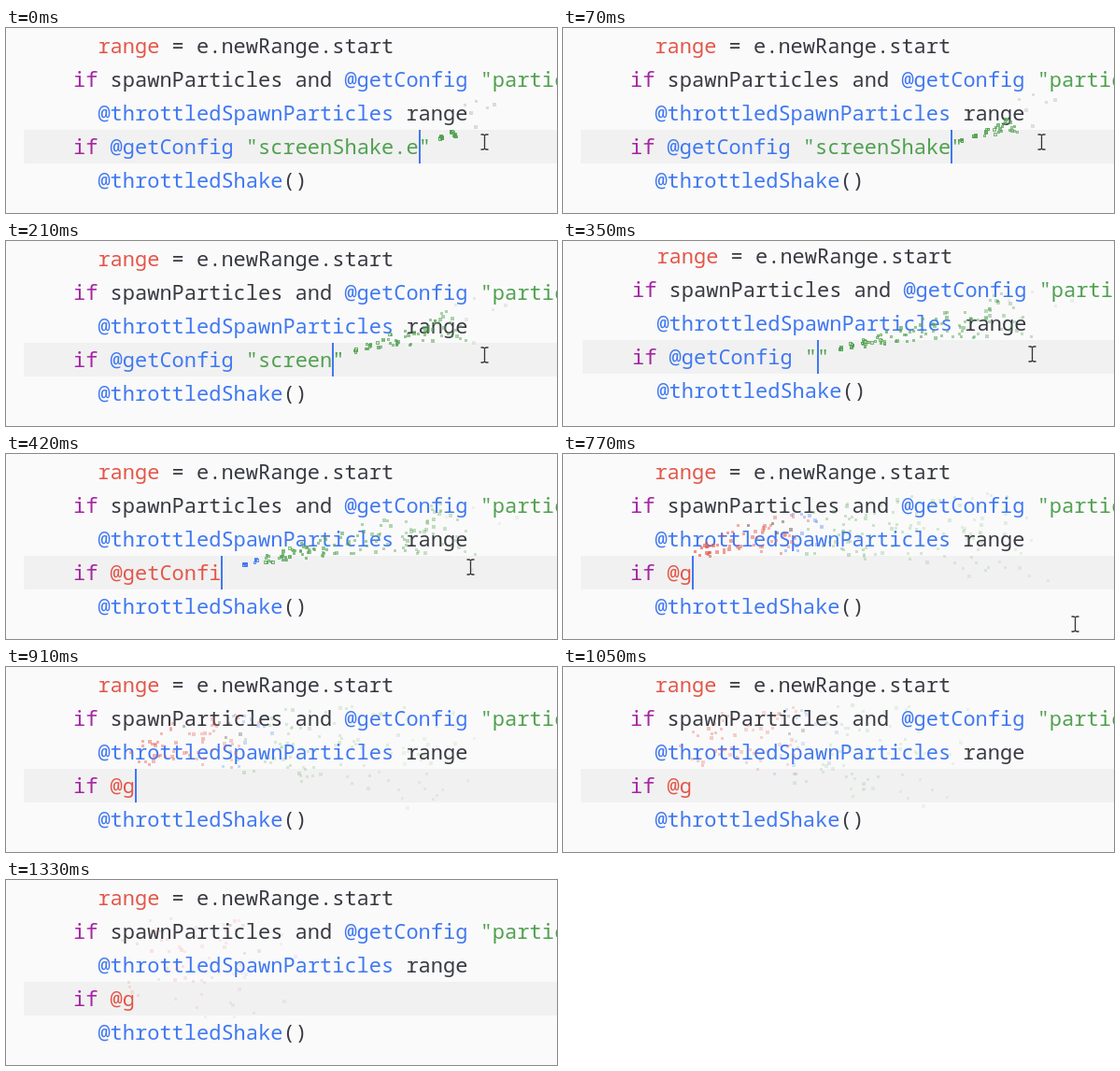
Animation, 590 px wide and 198 px high, one loop 1400 ms. Source, as an HTML page:

```html
<!DOCTYPE html>
<html lang="en">
<head>
<meta charset="utf-8">
<title>Typing particles</title>
<style>
  html, body { margin: 0; width: 100%; height: 100%; overflow: hidden; background: #fafafa; }
  svg { display: block; width: 590px; height: 198px; }
  text { font: 22px "Noto Sans Mono", "DejaVu Sans Mono", monospace; white-space: pre; fill: #383a42; }
  .blue { fill: #4078f2; }
  .red { fill: #e45649; }
  .green { fill: #50a14f; }
  .purple { fill: #a626a4; }
</style>
</head>
<body>
<svg viewBox="0 0 590 198">
  <g id="screen">
    <rect x="19" y="109" width="600" height="36" fill="#f1f1f1"/>
    <text x="98.4" y="27"><tspan class="red">range</tspan> = e.newRange.start</text>
    <text x="72" y="63"><tspan class="purple">if</tspan> spawnParticles and <tspan class="blue">@getConfig</tspan> <tspan class="green">"particles</tspan></text>
    <text x="98.4" y="99"><tspan class="blue">@throttledSpawnParticles</tspan> range</text>
    <text id="line" x="72" y="135"></text>
    <text x="98.4" y="171"><tspan class="blue">@throttledShake</tspan>()</text>
    <rect id="caret" y="109" width="2" height="36" fill="#4078f2"/>
    <g id="sparks" shape-rendering="crispEdges"></g>
  </g>
  <path id="mouse" d="M-4 -8H-1.5L0 -7L1.5 -8H4M-4 8H-1.5L0 7L1.5 8H4M0 -7V7" fill="none" stroke="#333" stroke-width="1.3"/>
</svg>
<script>
const LOOP = 1400, STEP = 70, LEFT = 72, CHAR = 13.2, TICK = 1000 / 60;
const CODE = 'if @getConfig "screenShake.e';
const GREEN = '#50a14f', BLUE = '#4078f2', RED = '#e45649', DARK = '#45302f', PALE = '#a9b3a7';

const $ = id => document.getElementById(id);
const line = $('line'), caret = $('caret'), sparks = $('sparks'), mouse = $('mouse'), view = $('screen');

// [time, caret column] and [time, x, y]
const typing = [[-90, 31], [0, 28], [210, 21], [420, 12], [560, 7], [630, 5]];
const pointer = [[0, 512, 122], [210, 512, 122], [420, 497, 121], [560, 492, 131],
  [630, 500, 144], [770, 548, 182], [910, 592, 214]];
const shakes = { 350: [2, -3], 560: [-3, 2] };

// Linear interpolation of column `to` over column `from`
function lerp(keys, v, from, to) {
  const up = keys[1][from] > keys[0][from];
  let i = 1;
  while (i < keys.length - 1 && (up ? v > keys[i][from] : v < keys[i][from])) i++;
  const a = keys[i - 1], b = keys[i];
  const k = Math.min(1, Math.max(0, (v - a[from]) / (b[from] - a[from])));
  return a[to] + (b[to] - a[to]) * k;
}

let seed = 20;
function random() {
  seed = (seed + 0x6d2b79f5) | 0;
  let r = Math.imul(seed ^ (seed >>> 15), seed | 1);
  r ^= r + Math.imul(r ^ (r >>> 7), r | 61);
  return ((r ^ (r >>> 14)) >>> 0) / 4294967296;
}

function hue(col) {
  if (col > 31) return PALE;
  if (col > 14) return GREEN;
  if (col > 12) return BLUE;
  return (col === 10 || col === 11) && random() < 0.45 ? DARK : RED;
}

// A burst starts where the caret stood before the deletion
const particles = [];
function burst(col, born, count) {
  for (let i = 0; i < count; i++) {
    particles.push({
      born, x: LEFT + CHAR * (col + 0.9), y: 122,
      vx: random() * 2 - 1, vy: random() * 2 - 3.5,
      size: random() < 0.3 ? 4 : 3, hollow: random() < 0.5, color: hue(col)
    });
  }
}
burst(32, -300, 6);
for (let col = 30; col >= 5; col--) {
  burst(col, lerp(typing, col, 1, 0), 4 + Math.floor(random() * 8));
}

function drawSparks(t) {
  let out = '';
  for (const p of particles) {
    const n = (t - p.born) / TICK, alpha = 0.9 * 0.96 ** n;
    if (n <= 0 || alpha < 0.09) continue;
    const x = Math.round(p.x + p.vx * n - p.size / 2);
    const y = Math.round(p.y + p.vy * n + 0.0375 * n * n - p.size / 2);
    const box = (d, fill) => `<rect x="${x + d}" y="${y + d}" width="${p.size - 2 * d}" height="${p.size - 2 * d}" fill="${fill}" opacity="${alpha.toFixed(3)}"/>`;
    out += box(0, p.color);
    if (p.hollow && n < 8) out += box(1, '#f1f1f1');
  }
  sparks.innerHTML = out;
}

function drawLine(cols) {
  const code = CODE.slice(0, cols), quoted = cols > 14;
  const span = (name, s) => `<tspan class="${name}">${s}</tspan>`;
  line.innerHTML = span('purple', 'if') + ' ' +
    span(quoted ? 'blue' : 'red', code.slice(3, 13)) +
    (quoted ? ' ' + span('green', code.slice(14) + '"') : '');
}

function render(t) {
  const cols = Math.round(lerp(typing, t, 0, 1));
  drawLine(cols);
  caret.setAttribute('x', Math.round(LEFT + CHAR * cols));
  caret.style.display = t < 1030 ? '' : 'none';
  drawSparks(t);
  const [dx, dy] = shakes[t] || [0, 0];
  view.setAttribute('transform', `translate(${dx} ${dy})`);
  const mx = Math.round(lerp(pointer, t, 0, 1)), my = Math.round(lerp(pointer, t, 0, 2));
  mouse.setAttribute('transform', `translate(${mx + 0.5} ${my})`);
}

let last = -1;
function tick() {
  const t = Math.floor((performance.now() % LOOP) / STEP) * STEP;
  if (t !== last) render(last = t);
  requestAnimationFrame(tick);
}
tick();
</script>
</body>
</html>
```
